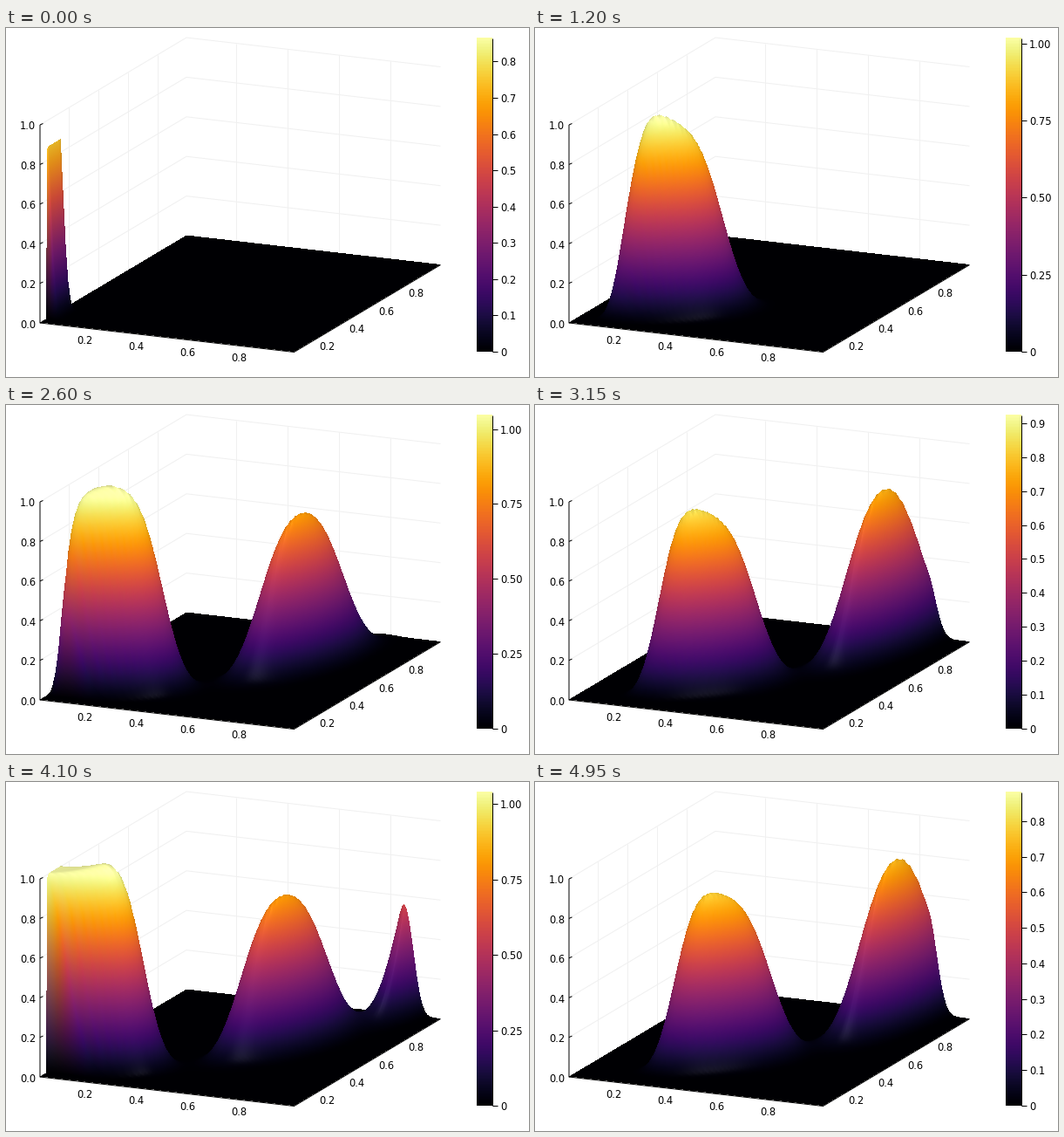
Write a matplotlib script that moves like this. It is 600x400 px and loops after 5000 ms.

```python
import numpy as np
import matplotlib as mpl
import matplotlib.pyplot as plt
from matplotlib.animation import FuncAnimation

W, H, DPI = 600, 400, 100
FRAMES, INTERVAL = 100, 50
N = 100                      # cells per side
FRAME_DT, STEPS = 0.02, 6
PX = 72 / DPI                # one pixel in points

# Screen position of the box: origin plus one vector per axis
ORIGIN = np.array([39.0, 338.0])
EX, EY, EZ = np.array([291.5, 33.5]), np.array([168.0, -100.0]), np.array([0.0, -227.0])
CAM = np.array([0.455, -0.79, 0.41])
CMAP = mpl.colormaps["inferno"]
BAR_X0, BAR_X1, BAR_TOP, BAR_BOTTOM = 540, 558, 11.5, 371


def project(u, v, w=0.0):
    return ORIGIN + u * EX + v * EY + w * EZ


def unit(value):
    """Data coordinate (cell centres span the axis) to box coordinate."""
    return (value - 0.5 / N) / (1 - 1 / N)


# --- Upwind transport of a pulsed inflow through a bending flow ---
centres = (np.arange(N) + 0.5) / N
ahead = centres + 0.5 / N
u_face = np.cos(np.pi / 2 * np.minimum(ahead + 0.5 / N, 1))
v_cell = np.sin(np.pi / 2 * ahead)
inlet = ((centres > 0.05) & (centres < 0.15)).astype(float)


def rate(c, inflow):
    fx, fy = c * u_face, c * v_cell
    out = -fx - fy
    out[:, 1:] += fx[:, :-1]
    out[:, 0] += inflow * inlet
    out[1:] += fy[:-1]
    return N * out


def simulate():
    dt = FRAME_DT / STEPS
    c = np.zeros((N, N))
    fields = []
    for step in range(FRAMES * STEPS):
        on = float(np.sin(3 * np.pi * (step + 0.5) * dt) > 0)
        term = c
        for order in range(1, 5):
            term = rate(term, on if order == 1 else 0.0) * dt / order
            c = c + term
        if step % STEPS == STEPS - 1:
            fields.append(c)
    return fields


# --- Height field renderer: march each pixel column from front to back ---
SAMPLES = 400
cols = np.arange(39, 499)
C = len(cols)
depth = cols + 0.5 - ORIGIN[0]
v_near = np.maximum(0, (depth - EX[0]) / EY[0])
v_far = np.minimum(1, depth / EY[0])
ray_v = v_near + (v_far - v_near) * np.linspace(0, 1, SAMPLES)[:, None]
ray_u = (depth - EY[0] * ray_v) / EX[0]
floor_y = ORIGIN[1] - 0.5 + EX[1] * ray_u + EY[1] * ray_v


def weights(u, v):
    gx, gy = np.clip(u, 0, 1) * (N - 1), np.clip(v, 0, 1) * (N - 1)
    ix = np.minimum(gx.astype(int), N - 2)
    iy = np.minimum(gy.astype(int), N - 2)
    return iy * N + ix, gx - ix, gy - iy


def bilinear(flat, w):
    i, fx, fy = w
    if flat.ndim > 1:
        fx, fy = fx[:, None], fy[:, None]
    near = flat[i] * (1 - fx) + flat[i + 1] * fx
    far = flat[i + N] * (1 - fx) + flat[i + N + 1] * fx
    return near * (1 - fy) + far * fy


ray_weights = weights(ray_u, ray_v)


def surface_colours(c, w):
    """Height colours under a soft headlight with a faint highlight."""
    gy, gx = np.gradient(c, 1 / (N - 1))
    facing = (CAM[2] - gx * CAM[0] - gy * CAM[1]) / np.sqrt(1 + gx**2 + gy**2)
    facing = bilinear(np.clip(facing, 0, 1).ravel(), w)[:, None]
    heights = c.ravel()
    smooth = CMAP(bilinear(heights, w))[:, :3]
    meshed = bilinear(CMAP(heights)[:, :3], w)
    rgb = (smooth + meshed) / 2 * (0.82 + 0.2 * facing)
    return np.clip(rgb + 0.08 * facing**50, 0, 1)


def render(c):
    y = floor_y + EZ[1] * bilinear(c.ravel(), ray_weights)
    horizon = np.minimum.accumulate(y, axis=0)
    row = np.clip(np.ceil(horizon - 0.5), 0, H).astype(int)
    hist = np.bincount((row * C + np.arange(C)).ravel(), minlength=(H + 1) * C)
    hist = hist.reshape(H + 1, C)
    hit = np.cumsum(hist[::-1], axis=0)[::-1][1:]

    r, col = np.nonzero((hit > 0) & (hit < SAMPLES))
    k = hit[r, col]
    y0, y1 = y[k - 1, col], y[k, col]
    f = np.clip((y0 - r - 0.5) / np.maximum(y0 - y1, 1e-6), 0, 1)
    u = ray_u[k - 1, col] * (1 - f) + ray_u[k, col] * f
    v = ray_v[k - 1, col] * (1 - f) + ray_v[k, col] * f

    image = np.zeros((H, W, 4))
    image[r, cols[col], :3] = surface_colours(c, weights(u, v))
    image[r, cols[col], 3] = 1
    return image


# --- Fixed parts ---
plt.rcParams["font.family"] = "DejaVu Sans"
fig = plt.figure(figsize=(W / DPI, H / DPI), dpi=DPI, facecolor="white")
ax = fig.add_axes([0, 0, 1, 1])
ax.axis("off")


def line(*points, color="black", width=1.0, z=3):
    xs, ys = zip(*points)
    return ax.plot(xs, ys, color=color, lw=width * PX, zorder=z,
                   solid_capstyle="butt")[0]


def label(x, y, text, align="center"):
    return ax.text(x, y, text, fontsize=8.3, ha=align, va="center_baseline", zorder=4)


GRID = "#f0f0f0"
for t in (0.2, 0.4, 0.6, 0.8):
    s, name = unit(t), f"{t:.1f}"
    line(project(s, 1), project(s, 1, 1), color=GRID, z=1)
    line(project(0, s), project(0, s, 1), color=GRID, z=1)
    label(*(project(s, 0) + (-6.2, 12.5)), name)
    label(*(project(1, s) + (5.2, 12.3)), name)
for t in np.linspace(0, 1, 6):
    line(project(0, 0, t), project(0, 1, t), project(1, 1, t), color=GRID, z=1)
    x, y = project(0, 0, t)
    line((x, y), (x + 3.5, y - 1.5))
    label(34.3, y + 0.5, f"{t:.1f}", "right")
line(project(0, 0, 1), project(0, 0), project(1, 0), project(1, 1))

surface = ax.imshow(np.zeros((H, W, 4)), extent=(0, W, H, 0),
                    interpolation="nearest", zorder=2)
ax.imshow(np.linspace(1, 0, 256)[:, None], cmap=CMAP, aspect="auto",
          extent=(BAR_X0, BAR_X1, BAR_BOTTOM, BAR_TOP),
          interpolation="nearest", zorder=2)
line((BAR_X1, BAR_TOP), (BAR_X1, BAR_BOTTOM))
bar_ticks = [(line((BAR_X1, 0), (BAR_X1 + 6, 0)), label(566.8, 0, "", "left"))
             for _ in range(11)]
ax.set_xlim(0, W)
ax.set_ylim(H, 0)
ax.set_aspect("auto")

fields = simulate()


def update_bar(top):
    step, digits = (0.25, 2) if top > 1 else (0.1, 1)
    for i, (tick, text) in enumerate(bar_ticks):
        value = i * step
        shown = value <= top
        y = BAR_BOTTOM - (BAR_BOTTOM - BAR_TOP) * value / top
        tick.set_ydata([y, y])
        text.set_y(y)
        text.set_text(f"{value:.{digits}f}" if i else "0")
        tick.set_visible(shown)
        text.set_visible(shown)


def update(frame):
    c = fields[frame]
    surface.set_data(render(c))
    update_bar(c.max())


anim = FuncAnimation(fig, update, frames=FRAMES, interval=INTERVAL,
                     repeat=True, repeat_delay=0, blit=False)
plt.show()
```
